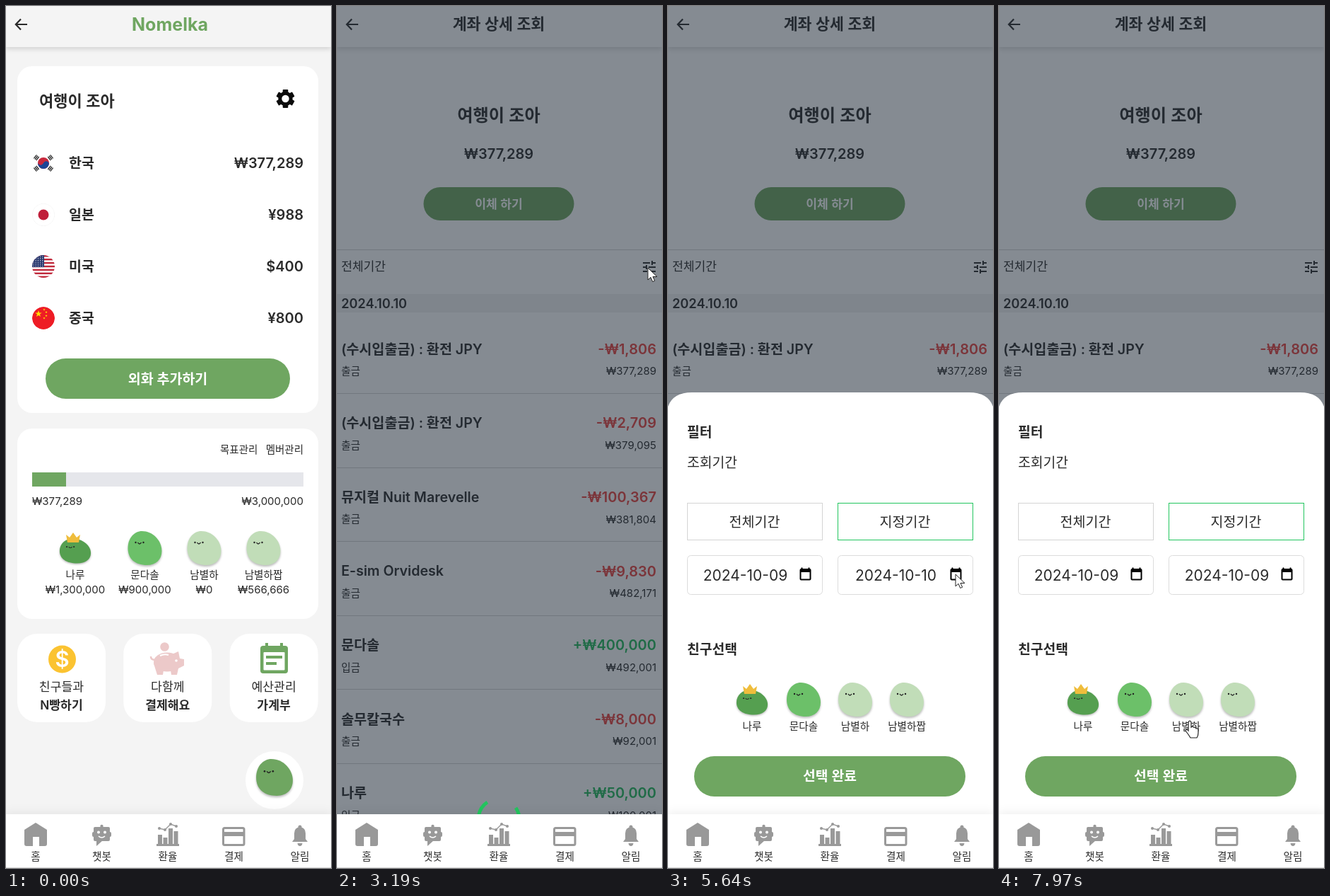
These frames come from a looping animation (460 px wide and 1218 px high, 8 s). An HTML page:

```html
<!DOCTYPE html>
<html lang="ko">
<head>
<meta charset="utf-8">
<style>
  html, body { margin: 0; width: 460px; height: 1218px; overflow: hidden; background: #fff }
  svg { display: block; font-family: Inter, "Noto Sans CJK KR", "Noto Sans CJK", sans-serif }
  .down { filter: drop-shadow(0 3px 3px #0002) }
  .up { filter: drop-shadow(0 -4px 6px #0000000d) }
  .bean { filter: drop-shadow(0 2px 1.5px #0004) }
  .popup { filter: drop-shadow(0 3px 4px #0005) }
</style>
</head>
<body>
<svg id="stage" width="460" height="1218" viewBox="0 0 460 1218"></svg>
<script>
const LOOP = 8000, GREEN = '#6fa661', LIME = '#22c55e', INK = '#2b2b2b', GREY = '#999';
const FRIENDS = ['나루', '문다솔', '남별하', '남별하짭'];
const BEANS = ['#559f50', '#6cc069', '#c1ddb8', '#c1ddb8'];

// ---- drawing helpers ----
const rect = (x, y, w, h, fill, r = 0, more = '') =>
  `<rect x="${x}" y="${y}" width="${w}" height="${h}" rx="${r}" fill="${fill}" ${more}/>`;
const circle = (x, y, r, fill, more = '') => `<circle cx="${x}" cy="${y}" r="${r}" fill="${fill}" ${more}/>`;
const path = (d, fill, more = '') => `<path d="${d}" fill="${fill}" ${more}/>`;
const line = (d, color, width, more = '') => path(d, 'none', `stroke="${color}" stroke-width="${width}" ${more}`);
const at = (x, y, body, more = '') => `<g transform="translate(${x} ${y}) ${more}">${body}</g>`;
const group = (id, body) => `<g id="${id}">${body}</g>`;
// y is the vertical middle of the text
const text = (x, y, str, size, { bold, end, mid, fill = INK, weight = bold ? 600 : 400, id = '' } = {}) =>
  `<text ${id && `id="${id}"`} x="${x}" y="${y + size * .36}" font-size="${size}" font-weight="${weight}" fill="${fill}"
    text-anchor="${end ? 'end' : mid ? 'middle' : 'start'}">${str}</text>`;
const pill = (x, y, w, h, label, size) => rect(x, y, w, h, GREEN, h / 2) +
  text(x + w / 2, y + h / 2, label, size, { bold: 1, mid: 1, fill: '#fff' });
const star = (x, y, r, fill) => {
  const points = Array.from({ length: 10 }, (_, i) => {
    const a = i * Math.PI / 5, d = i % 2 ? r * .4 : r;
    return [x + d * Math.sin(a), y - d * Math.cos(a)];
  });
  return `<polygon points="${points}" fill="${fill}"/>`;
};

// ---- shared parts ----
const face = circle(-13, -8, 1.2, '#222') + circle(-2, -8, 1.2, '#222') + line('M-10 -8q2.5 4 5 0', '#222', 1.3);
const bean = (x, y, color, scale = '') => at(x, y,
  path('M-24 0C-24-14-15-24-4-24C12-24 24-10 24 4C24 16 16 24 3 24C-14 24-24 15-24 0Z', color, 'class="bean"') + face, scale);
const friend = (i, x, y) => i
  ? bean(x, y, BEANS[i])
  : bean(x, y + 4, BEANS[0], 'scale(.92 .73)') +
    at(x - 3, y - 15, path('M-10-4L-8 7H8L10-4L5 0L0-7L-5 0Z', '#efbd3c'));
const header = (bg, title) => rect(0, 0, 460, 58, bg, 0, 'class="down"') +
  line('M30 26H15M21 18.5L13.8 26L21 33.5', INK, 2.2) + title;

const nav = () => {
  const home = path('M26 1164L42 1154L58 1164V1184Q58 1187 55 1187H47V1174H38V1187H29Q26 1187 26 1184Z', GREY);
  const robot = rect(124, 1160, 23, 20, GREY, 2) + rect(122, 1167, 27, 7, GREY, 2) + circle(135.5, 1159, 2.2, GREY) +
    path('M128 1179V1187L137 1179Z', GREY) + circle(131, 1167.5, 2, '#fff') + circle(140, 1167.5, 2, '#fff') +
    line('M131 1173q4.5 4 9 0', '#fff', 1.6);
  const chart = [[215, 1171], [222.5, 1175], [230, 1162], [237.5, 1166]]
    .map(([x, y]) => rect(x, y, 6, 1185 - y, GREY)).join('') + rect(213, 1184, 32, 3, GREY) +
    line('M217 1162L225 1164L233 1156L241 1159', GREY, 1.5) +
    [[217, 1162], [225, 1164], [233, 1156], [241, 1159]].map(([x, y]) => circle(x, y, 2, GREY)).join('');
  const card = rect(307.5, 1161.5, 29.5, 24, '#fff', 2, `stroke="${GREY}" stroke-width="3"`) + rect(307, 1167, 30, 6, GREY);
  const bell = path('M405 1181L408 1177V1169Q408 1161 416 1160Q424 1161 424 1169V1177L427 1181Z', GREY) +
    circle(416, 1160, 2.5, GREY) + path('M412.5 1183H419.5Q419 1187 416 1187Q413 1187 412.5 1183Z', GREY);
  return rect(0, 1142, 460, 76, '#fff', 0, 'class="up"') + rect(0, 1217, 460, 1, '#dcdcdc') +
    home + robot + chart + card + bell +
    ['홈', '챗봇', '환율', '결제', '알림'].map((s, i) => text(42 + 93.5 * i, 1202, s, 14.6, { mid: 1 })).join('');
};

// ---- account overview ----
const flags = () => {
  const bars = [52, 128, 232, 308].map(a => `<g transform="rotate(${a})">` +
    [-14.8, -12.7, -10.6].map(y => rect(-3.2, y - .6, 6.4, 1.3, '#222')).join('') + '</g>').join('');
  const korea = circle(0, 0, 16, '#fff') + bars + circle(0, 0, 8, '#c8283c') +
    path('M-8 0A8 8 0 0 0 8 0C5-4 2-3 0 0S-5 4-8 0Z', '#1c4596');
  const japan = circle(0, 0, 16, '#fff', 'stroke="#f3f3f3"') + circle(0, 0, 7.5, '#c01f3a');
  let usa = circle(0, 0, 16, '#fff');
  for (let i = 0; i < 13; i += 2) usa += rect(-16, -16 + i * 2.46, 32, 2.46, '#c02a3c');
  usa += rect(-16, -16, 17, 17, '#2b3a70');
  for (let i = 0; i < 30; i++) usa += circle(-14 + i % 5 * 3.2, -14 + (i / 5 | 0) * 2.7, .6, '#fff');
  const china = circle(0, 0, 16, '#ee1c25') + star(-7, -6, 5, '#ffde00') +
    [[1, -12], [4, -8.5], [4, -3.5], [1, 0]].map(([x, y]) => star(x, y, 1.8, '#ffde00')).join('');
  return [korea, japan, usa, china].map((f, i) => at(53, 222 + 73 * i, `<g clip-path="url(#disc)">${f}</g>`)).join('');
};

const overview = () => {
  const gear = circle(0, 0, 7.7, 'none', 'stroke="#0b0b0b" stroke-width="5"') +
    [0, 60, 120, 180, 240, 300].map(a => rect(-3.8, -13, 7.6, 5.5, '#0b0b0b', 1, `transform="rotate(${a})"`)).join('');
  const wallets = [['한국', '₩377,289'], ['일본', '¥988'], ['미국', '$400'], ['중국', '¥800']].map(([name, sum], i) =>
    text(89, 222 + 73 * i, name, 19.5, { bold: 1 }) + text(421, 222 + 73 * i, sum, 20, { bold: 1, end: 1 })).join('');
  const paid = ['₩1,300,000', '₩900,000', '₩0', '₩566,666'];
  const members = FRIENDS.map((name, i) => {
    const x = [98, 196.5, 280.5, 364.5][i];
    return friend(i, x, 766) + text(x, 804, name, 14.6, { mid: 1 }) + text(x, 825, paid[i], 15, { mid: 1 });
  }).join('');
  const tiles = [['친구들과', 'N빵하기'], ['다함께', '결제해요'], ['예산관리', '가계부']].map(([a, b], i) => {
    const x = 16 + 150.3 * i;
    return rect(x, 887, 125, 125, '#fff', 28) + text(x + 62.5, 962, a, 17.2, { mid: 1 }) +
      text(x + 62.5, 988, b, 17.2, { bold: 1, mid: 1 });
  }).join('');
  const PINK = '#ecc9c9';
  const coin = circle(79.5, 923, 19.5, '#fbc331') + text(79.5, 922.5, '$', 31, { bold: 1, mid: 1, fill: '#fff' });
  const pig = `<ellipse cx="228" cy="927" rx="19" ry="13.5" fill="${PINK}"/>` + circle(224.5, 905.5, 6.3, PINK) +
    path('M209 929L214 945H222L223 939H233L234 945H242L244 936L252 932V923L246 922L244 912L235 916Z', PINK) +
    line('M205 919Q205 924 211 924', PINK, 2.5) + line('M218 918Q224 915 230 917', '#fff', 2) + circle(241, 925, 1.8, '#fff');
  const planner = rect(360, 904, 39, 39, GREEN, 4) + rect(367, 900, 4, 8, GREEN) + rect(388, 900, 4, 8, GREEN) +
    rect(364.5, 913, 30, 25.5, '#fff', 1) + rect(368, 918, 23, 4, GREEN) + rect(368, 927, 15, 4, GREEN);
  return rect(0, 0, 460, 1218, '#f4f4f4') +
    header('#f4f4f4', text(232, 26, 'Nomelka', 25, { weight: 700, mid: 1, fill: GREEN })) +
    rect(16, 85, 426, 490, '#fff', 21) + text(47, 134, '여행이 조아', 22, { bold: 1 }) + at(395.5, 131, gear) +
    flags() + wallets + pill(56, 498, 346, 57, '외화 추가하기', 19.5) +
    rect(16, 597, 426, 269, '#fff', 21) + text(303, 627, '목표관리', 14.5) + text(421, 627, '멤버관리', 14.5, { end: 1 }) +
    rect(37, 659, 384, 20, '#e5e6eb') + rect(37, 659, 48, 20, GREEN) +
    text(37, 700, '₩377,289', 15) + text(421, 700, '₩3,000,000', 15, { end: 1 }) +
    members + tiles + coin + pig + planner +
    circle(380, 1094, 41, '#fff') + bean(380, 1090, GREEN, 'scale(1.08)');
};

// ---- account history ----
const history = () => {
  const rows = [
    ['(수시입출금) : 환전 JPY', '-₩1,806', '₩377,289'], ['(수시입출금) : 환전 JPY', '-₩2,709', '₩379,095'],
    ['뮤지컬 Nuit Marevelle', '-₩100,367', '₩381,804'], ['E-sim Orvidesk', '-₩9,830', '₩482,171'],
    [FRIENDS[1], '+₩400,000', '₩492,001'], ['솔무칼국수', '-₩8,000', '₩92,001'], [FRIENDS[0], '+₩50,000', '₩100,001'],
  ].map(([name, sum, left], i) => {
    const y = 484.5 + 104.6 * i, paidIn = sum[0] == '+';
    return text(6, y, name, 19.6, { bold: 1 }) +
      text(452, y, sum, 20, { bold: 1, end: 1, fill: paidIn ? '#22bb5b' : '#ea4340' }) +
      text(6, y + 31.5, paidIn ? '입금' : '출금', 14.6) + text(452, y + 31.5, left, 15, { end: 1 }) +
      rect(0, Math.round(y + 62.5), 460, 1, '#d4d4d4');
  }).join('');
  const tune = path('M3 17v2h6v-2H3zM3 5v2h10V5H3zm10 16v-2h8v-2h-8v-2h-2v6h2zM7 9v2H3v2h4v2h2V9H7zm14 4v-2H11v2h10zm-6-4h2V7h4V5h-4V3h-2v6z', INK);
  return rect(0, 0, 460, 1218, '#fff') + header('#fff', text(229, 25.5, '계좌 상세 조회', 21.7, { bold: 1, mid: 1 })) +
    text(229, 154.5, '여행이 조아', 24.2, { bold: 1, mid: 1 }) + text(229, 209, '₩377,289', 20, { bold: 1, mid: 1 }) +
    pill(122.5, 256, 213, 47, '이체 하기', 17.2) + rect(0, 344, 460, 1, '#d4d4d4') +
    text(6, 368, '전체기간', 17.1) + at(430, 357, tune) +
    rect(0, 407, 460, 26, '#f3f3f3') + text(6, 420, '2024.10.10', 18.2, { bold: 1 }) + rows;
};

// ---- filter sheet ----
const sheet = () => {
  const side = (i, label) => {
    const x = 27.5 + 213 * i;
    return rect(x, 702.5, 191, 52, '#fff', 0, `id="tab${i}"`) + text(x + 95, 728.5, label, 19.5, { mid: 1 }) +
      rect(x, 776.5, 191, 55, '#fafafa', 5, `id="field${i}" stroke="#dcdcdc"`) +
      text(x + 82, 804, '2024-10-09', 21, { mid: 1, id: 'date' + i });
  };
  const icon = x => rect(x - 7, 796, 14, 14.5, '#fff', 1, 'stroke="#000" stroke-width="2"') +
    rect(x - 7, 796, 14, 4, '#000') + rect(x - 6, 793.5, 2, 3, '#000') + rect(x + 4, 793.5, 2, 3, '#000');
  return path('M0 1142V566Q7 546 34 546H426Q453 546 460 566V1142Z', '#fff') +
    text(27, 602, '필터', 19.2, { bold: 1 }) + text(27, 645, '조회기간', 19.3) +
    side(0, '전체기간') + side(1, '지정기간') + group('icons', icon(194.5) + icon(407.5)) +
    text(27, 909, '친구선택', 19.3, { bold: 1 }) +
    FRIENDS.map((name, i) => friend(i, 119 + 73 * i, 980) + text(119 + 73 * i, 1018, name, 14.6, { mid: 1 })).join('') +
    pill(37, 1060, 384, 57, '선택 완료', 19.3);
};

// ---- date picker ----
const STEP = 36.4;
const picker = () => {
  let days = '';
  [...'일월화수목금토'].forEach((d, i) => days += text(272 + STEP * i, 909, d, 14.5, { mid: 1 }));
  for (let i = 0; i < 42; i++) {
    const n = i - 1, day = n < 1 ? n + 30 : n > 31 ? n - 31 : n, chosen = n == 10;
    days += text(272 + STEP * (i % 7), 946 + STEP * (i / 7 | 0), day, 15, {
      mid: 1, bold: chosen, fill: chosen ? '#fff' : n < 1 || n > 31 ? '#7d7d7d' : '#111' });
  }
  return rect(240.5, 831.5, 280, 363, '#fff', 0, 'class="popup" stroke="#777"') + rect(240, 831, 220, 1.2, '#333') +
    text(254, 862, '2024년 10월', 14.3, { weight: 700, fill: '#111' }) + path('M344 859.5H354L349 865Z', '#111') +
    line('M449 872V853M440 862L449 853L458 862', '#111', 1.5) +
    rect(0, 0, 36, 36, '#b5d5fb', 3, 'id="hover" stroke="#222"') +
    rect(401, 965, 34, 34, '#0a78ff', 2, 'stroke="#111" stroke-width="2"') + days +
    text(268, 1171, '삭제', 15, { fill: '#0a66c2' });
};

const spinner = line('M29 0A29 29 0 1 1 0 -29', LIME, 5);
const arrow = path('M0 0V17L4 13.3L6.7 19.5L9.7 18.2L7 12.5H13Z', '#fff', 'stroke="#222"');
const hand = path('M-2 2Q0-2 2 2V9Q4 7 6 9.5Q8 8 9 11Q12 10 12 13V17Q12 21 10 24H1Q-2 19-6 14Q-5 11-2 14Z', '#fff', 'stroke="#222" stroke-width="1.2"');

stage.innerHTML = '<clipPath id="disc"><circle r="16"/></clipPath>' +
  group('overviewPage', overview()) + group('historyPage', history()) +
  group('blank', rect(0, 0, 460, 1218, '#fff')) + group('dim', rect(0, 0, 460, 1142, '#1f2937', 0, 'opacity=".54"')) +
  group('sheetLayer', sheet()) + group('loader', spinner) + nav() + group('pickerLayer', picker()) +
  group('pointer', circle(0, 0, 16, '#fff200', 'id="press" opacity=".6"') + group('arrowShape', arrow) + group('handShape', hand));

// ---- timeline ----
const MOVES = [ // time, x, y
  [390, 441, 647], [670, 424, 470], [950, 358, 290], [1160, 377, 231], [1230, 377, 224],
  [2090, 377, 224], [2440, 406, 296], [2720, 440, 370],
  [4050, 440, 370], [4330, 270, 600], [4470, 183, 740], [4540, 215, 764], [4620, 293, 738],
  [5010, 293, 738], [5290, 352, 775], [5570, 407, 803],
  [5850, 407, 803], [6130, 410, 890], [6330, 392, 950], [6400, 381, 982],
  [6680, 381, 982], [6750, 380, 989], [7070, 380, 989], [7350, 280, 1084],
  [7480, 280, 1084], [7620, 289, 1066], [7830, 261, 1030], [7970, 270, 1010], [8000, 270, 1010],
];
const within = (t, ...spans) => spans.some(([a, b]) => t >= a && t < b);
const show = (el, on) => el.style.display = on ? '' : 'none';

// the pointer advances every 70 ms
function pointerAt(t) {
  const i = Math.max(0, MOVES.findLastIndex(m => m[0] <= t));
  const [t0, x0, y0] = MOVES[i], [t1, x1, y1] = MOVES[Math.min(i + 1, MOVES.length - 1)];
  const k = t1 > t0 ? Math.max(0, Math.floor((t - t0) / 70) * 70 / (t1 - t0)) : 0;
  return [x0 + (x1 - x0) * k, y0 + (y1 - y0) * k];
}

function render(t) {
  const custom = t >= 4950, opening = within(t, [3190, 3260]), loading = within(t, [1500, 1640]);
  show(overviewPage, t < 1500);
  show(historyPage, t >= 1640);
  show(blank, loading);
  show(dim, t >= 3190);
  show(sheetLayer, t >= 3260);
  sheetLayer.setAttribute('transform', `translate(0 ${t < 3330 ? 180 : 0})`);
  show(loader, loading || opening);
  const turn = -34 + .48 * Math.floor((t - (opening ? 3190 : 1500)) / 70) * 70;
  loader.setAttribute('transform', `translate(229 ${opening ? 1149 : 617}) rotate(${turn})`);

  tab0.setAttribute('stroke', custom ? '#d4d4d4' : LIME);
  tab1.setAttribute('stroke', custom ? LIME : '#d4d4d4');
  for (const f of [field0, field1]) f.setAttribute('fill', custom ? '#fff' : '#fafafa');
  show(icons, custom);
  date1.textContent = t < 6680 ? '2024-10-10' : '2024-10-09';

  const [x, y] = pointerAt(t);
  show(pickerLayer, within(t, [5850, 6680]));
  const col = Math.round((x - 272) / STEP), row = Math.round((y - 946) / STEP);
  show(hover, row >= 0);
  hover.setAttribute('transform', `translate(${254.3 + STEP * col} ${927.5 + STEP * row})`);

  show(pointer, t >= 390);
  pointer.setAttribute('transform', `translate(${x} ${y})`);
  const pointing = within(t, [1020, 1500], [2650, 3190], [4470, 5150], [7280, LOOP]);
  show(handShape, pointing);
  show(arrowShape, !pointing);
  show(press, within(t, [1230, 1360], [3050, 3190], [4820, 4950], [5710, 5850], [6540, 6680]));
}

const start = performance.now();
(function tick() {
  render((performance.now() - start) % LOOP);
  requestAnimationFrame(tick);
})();
</script>
</body>
</html>
```
